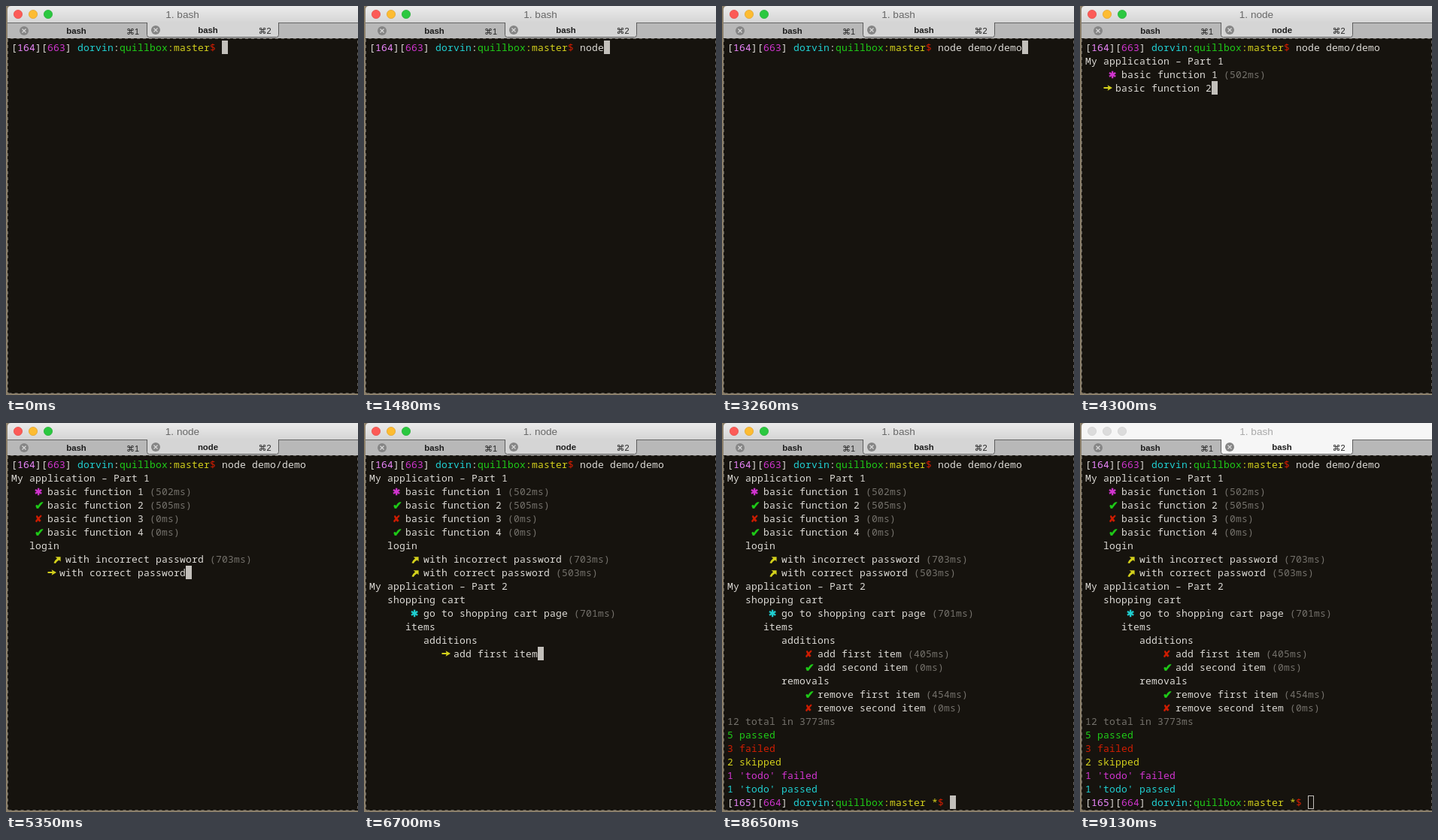
These frames come from a looping animation (468x518 px, 9.18 s). An HTML page:

```html
<!DOCTYPE html>
<html lang="en">
<head>
<meta charset="utf-8">
<style>
  html, body { margin: 0; width: 100%; height: 100%; overflow: hidden; background: #8b7f6a; }
  svg { display: block; }
  .term { font: 13px "Noto Sans Mono", "DejaVu Sans Mono", monospace; letter-spacing: calc(8px - .6em); white-space: pre; }
  .mark { font-family: "DejaVu Sans", sans-serif; letter-spacing: 0; stroke-width: .4; }
  .title { font: 13.6px "Liberation Sans", Arial, sans-serif; text-anchor: middle; }
  .tab { font: bold 11.4px "Liberation Sans", Arial, sans-serif; text-anchor: middle; fill: #1c1c1c; }
  .key { font: 11px "Liberation Sans", "DejaVu Sans", sans-serif; fill: #222; }
</style>
</head>
<body>
<svg id="stage" width="468" height="518" viewBox="0 0 468 518" xmlns="http://www.w3.org/2000/svg">
  <defs>
    <linearGradient id="bar" x2="0" y2="1">
      <stop offset="0" stop-color="#ebebeb"/><stop offset="1" stop-color="#d4d4d4"/>
    </linearGradient>
    <g id="close">
      <circle r="6" fill="#858585"/>
      <path d="M-2.5-2.5l5 5m0-5l-5 5" stroke="#d8d8d8" stroke-width="1.3"/>
    </g>
    <path id="arrow" d="M0 7.9H6.5L5.6 5.2L12 9L5.6 12.8L6.5 10.1H0L1 9Z"/>
    <path id="skipArrow" d="M2.6 6.2H9.6V12.6L7.6 10.4Q4.8 11.4 2.8 15L.4 14.2Q1.8 10.8 5 8.2Z"/>
  </defs>
  <path id="titleBar" d="M2 23V5Q2 0 7 0H468V23Z"/>
  <g id="lights"><circle cx="16" cy="11"/><circle cx="36" cy="11"/><circle cx="56" cy="11"/></g>
  <text id="title" class="title" x="234.5" y="16"></text>

  <rect x="2" y="22" width="466" height="21" fill="#b8b8b8"/>
  <path d="M2 22.5H188M362 22.5H468" stroke="#666"/>
  <path id="activeTab" d="M187.5 22V38.5Q187.5 41.5 190.5 41.5H359.5Q362.5 41.5 362.5 38.5V22" stroke="#5c5c5c"/>
  <use href="#close" x="24" y="33"/>
  <use href="#close" x="199" y="32"/>
  <text class="tab" x="93.5" y="37">bash</text>
  <text id="tabName" class="tab" x="268.5" y="36"></text>
  <text class="key" x="160" y="38">⌘1</text>
  <text class="key" x="335.5" y="37">⌘2</text>

  <path d="M2 43H468V516H6Q2 516 2 512Z" fill="#16130e"/>
  <path d="M2.5 512V43.5H467.5V512Q467.5 515.5 464 515.5H6Q2.5 515.5 2.5 512" fill="none" stroke="#64605a" stroke-dasharray="4 4"/>
  <g id="screen" class="term"></g>
</svg>
<script>
const LOOP = 9180, BLUR = 9130, ENTER = 3700, DONE = 7450;
const COL = 8, ROW = 18, LEFT = 7, TOP = 46;
const C = {
  white: '#dcdad5', grey: '#74716b', red: '#d01d02', green: '#1fcc18', yellow: '#d3d01c',
  magenta: '#d235d0', pink: '#ee88ff', cyan: '#20d0d2', cursor: '#c3c0bb'
};
// Glyph, colour and size of each result mark.
const MARKS = {
  todoFail: ['✱', C.magenta, 12.5], todoPass: ['✱', C.cyan, 12.5],
  pass: ['✔', C.green, 15.5], fail: ['✘', C.red, 12.5]
};

// Each entry: typed text, time of first key, time of last key.
const BURSTS = [['nod', 890, 1180], ['e', 1480, 1480], [' demo', 1770, 2360], ['/demo', 2660, 3260]];

const line = (at, col, text, color = C.white) => ({ at, col, text, color });
const test = (start, end, col, mark, text, ms) => ({ at: start, end, col, mark, text, ms });

const LINES = [
  line(3700, 0, 'My application – Part 1'),
  test(3700, 4150, 4, 'todoFail', 'basic function 1', 502),
  test(4150, 4750, 4, 'pass', 'basic function 2', 505),
  test(4750, 4750, 4, 'fail', 'basic function 3', 0),
  test(4750, 4750, 4, 'pass', 'basic function 4', 0),
  line(4750, 3, 'login'),
  test(4750, 5350, 7, 'skip', 'with incorrect password', 703),
  test(5350, 5950, 7, 'skip', 'with correct password', 503),
  line(5950, 0, 'My application – Part 2'),
  line(5950, 3, 'shopping cart'),
  test(5950, 6700, 7, 'todoPass', 'go to shopping cart page', 701),
  line(6700, 6, 'items'),
  line(6700, 9, 'additions'),
  test(6700, 7000, 13, 'fail', 'add first item', 405),
  test(7000, 7000, 13, 'pass', 'add second item', 0),
  line(7000, 9, 'removals'),
  test(7000, DONE, 13, 'pass', 'remove first item', 454),
  test(DONE, DONE, 13, 'fail', 'remove second item', 0),
  line(DONE, 0, '12 total in 3773ms', C.grey),
  line(DONE, 0, '5 passed', C.green),
  line(DONE, 0, '3 failed', C.red),
  line(DONE, 0, '2 skipped', C.yellow),
  line(DONE, 0, "1 'todo' failed", C.magenta),
  line(DONE, 0, "1 'todo' passed", C.cyan)
];

const $ = id => document.getElementById(id);
const x = col => LEFT + col * COL;
const y = row => TOP + row * ROW;

const put = (row, col, text, color) =>
  `<text x="${x(col)}" y="${y(row) + 14}" fill="${color}">${text}</text>`;

const icon = (row, col, id) => `<use href="#${id}" x="${x(col)}" y="${y(row)}" fill="${C.yellow}"/>`;

function mark(row, col, name) {
  if (name === 'skip') return icon(row, col, 'skipArrow');
  const [glyph, color, size] = MARKS[name];
  return `<text class="mark" x="${x(col) - 1}" y="${y(row) + 9 + size * .36}" font-size="${size}" ` +
    `fill="${color}" stroke="${color}">${glyph}</text>`;
}

const cursor = (row, col, hollow) => hollow
  ? `<rect x="${x(col) + .5}" y="${y(row) + .5}" width="7" height="17" fill="none" stroke="${C.cursor}"/>`
  : `<rect x="${x(col)}" y="${y(row)}" width="8" height="18" fill="${C.cursor}"/>`;

function prompt(row, first, second, suffix = '') {
  const parts = [['[', C.white], [first, C.pink], ['][', C.white], [second, C.magenta], ['] ', C.white],
    ['dorvin', C.cyan], [':', C.white], ['quillbox', C.green], [':master' + suffix, C.yellow], ['$', C.red]];
  let col = 0;
  return parts.map(([text, color]) => {
    const out = put(row, col, text, color);
    col += text.length;
    return out;
  }).join('');
}

function typed(t) {
  return BURSTS.map(([text, from, to]) => {
    if (t < from) return '';
    const step = (to - from) / (text.length - 1) || 1;
    return text.slice(0, Math.floor((t - from) / step + 1e-6) + 1);
  }).join('');
}

function drawLine(l, row, t) {
  if (!l.mark) return put(row, l.col, l.text, l.color);
  if (t < l.end) {
    return icon(row, l.col - 1, 'arrow') + put(row, l.col + 1, l.text, C.white) +
      cursor(row, l.col + 1 + l.text.length);
  }
  const textCol = l.col + 2;
  return mark(row, l.col, l.mark) + put(row, textCol, l.text, C.white) +
    put(row, textCol + l.text.length + 1, `(${l.ms}ms)`, C.grey);
}

function screen(t) {
  const command = typed(t);
  let out = prompt(0, '164', '663') + put(0, 35, command, C.white);
  if (t < ENTER) return out + cursor(0, 35 + command.length);
  LINES.forEach((l, i) => { if (t >= l.at) out += drawLine(l, i + 1, t); });
  if (t >= DONE) out += prompt(25, '165', '664', ' *') + cursor(25, 37, t >= BLUR);
  return out;
}

let shown = '';
function draw(t) {
  const blurred = t >= BLUR;
  const html = screen(t);
  if (html !== shown) $('screen').innerHTML = shown = html;
  $('title').textContent = t >= 4300 && t < 8650 ? '1. node' : '1. bash';
  $('title').setAttribute('fill', blurred ? '#a9a9a9' : '#686868');
  $('tabName').textContent = t >= 4300 && t < 8500 ? 'node' : 'bash';
  $('titleBar').setAttribute('fill', blurred ? '#f6f6f6' : 'url(#bar)');
  $('activeTab').setAttribute('fill', blurred ? '#f6f6f6' : '#d5d5d5');
  [['#fc5b57', '#e2463f'], ['#fdbc32', '#e0a028'], ['#2bc840', '#1fab30']].forEach(([fill, edge], i) => {
    const light = $('lights').children[i];
    light.setAttribute('r', 5.6);
    light.setAttribute('fill', blurred ? '#dcdcdc' : fill);
    light.setAttribute('stroke', blurred ? '#cfcfcf' : edge);
    light.setAttribute('stroke-width', .7);
  });
}

const began = performance.now();
function tick() {
  draw((performance.now() - began) % LOOP);
  requestAnimationFrame(tick);
}
tick();
</script>
</body>
</html>
```
